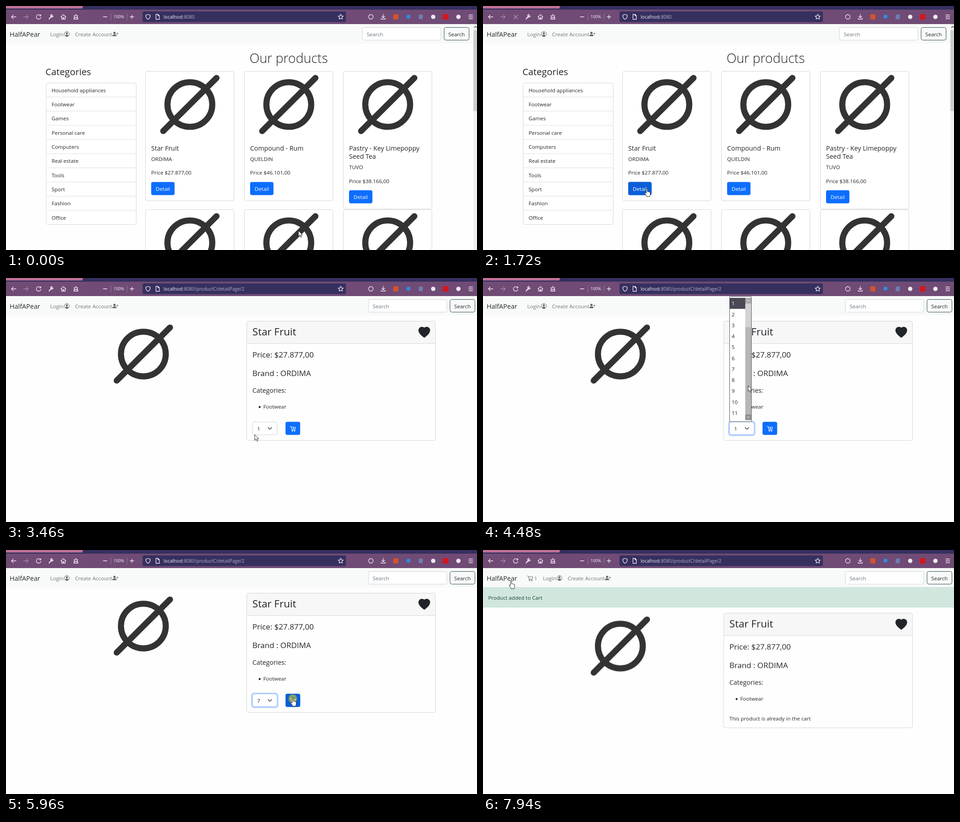
An HTML page for the animation above (8 s loop, 1038x540 px).

```html
<!DOCTYPE html>
<html lang="en">
<head>
<meta charset="utf-8">
<title>Shop walkthrough</title>
<style>
html, body { margin: 0; width: 100%; height: 100%; overflow: hidden; background: #fefefe; }
svg { display: block; width: 1038px; height: 540px; }
text { font: 11.6px "Open Sans", "Noto Sans", sans-serif; fill: #212529; white-space: pre; }
.h5 { font-size: 14.3px; }
.h4 { font-size: 17.1px; }
.h3 { font-size: 20.3px; }
.h2 { font-size: 22.6px; }
.display { font-size: 28.7px; font-weight: 300; }
.small { font-size: 10.1px; fill: #f4f1f8; }
.dim { fill: #b5b0ca; }
.muted { fill: #6c757d; }
.white { fill: #fff; }
.box { fill: #fff; stroke: #d4d5d6; }
.icon { fill: none; stroke: #f3e9f5; stroke-width: 1.3; stroke-linecap: round; stroke-linejoin: round; }
.primary { fill: #0d6efd; }
.hover { fill: #0b5ed7; }

/* Everything shares one 8 s loop. "cut" layers switch hard, others move. */
.cut { animation: 8s step-end infinite; }
#home { animation-name: home; }
#scroll { animation-name: home; }
#detail { animation-name: detail; }
#url { animation-name: url; }
#search { animation-name: search; }
#links { animation-name: links; }
#product { animation-name: product; }
#form { animation-name: form; }
.added { animation-name: added; }
#reload { animation-name: reload; }
#stop { animation-name: stop; }
#focus { animation-name: focus; }
#popup { animation-name: popup; }
#one, #pick1 { animation-name: one; }
#seven { animation-name: seven; }
#pick7 { animation-name: pick7; }
#pick1 { animation-name: pick1; }
#hoverDetail { animation-name: hoverDetail; }
#hoverCart { animation-name: hoverCart; }
#arrow { animation-name: arrow; }
#hand { animation-name: hand; }
#ripple { animation-name: ripple; }
#cursor { animation: cursor 8s ease-in-out infinite; }
#burst { animation: burst 8s linear infinite; }

@keyframes home { 0% { opacity: 1 } 29.6%, 100% { opacity: 0 } }
@keyframes detail { 0% { opacity: 0 } 29.6%, 100% { opacity: 1 } }
@keyframes url { 0% { opacity: 0 } 26.4%, 100% { opacity: 1 } }
@keyframes search { 0% { transform: none } 29.6%, 100% { transform: translateX(13px) } }
@keyframes links { 0% { transform: none } 81.25%, 100% { transform: translateX(34.4px) } }
@keyframes product { 0% { transform: none } 81.25%, 100% { transform: translateY(44.3px) } }
@keyframes form { 0% { opacity: 1 } 81.25%, 100% { opacity: 0 } }
@keyframes added { 0% { opacity: 0 } 81.25%, 100% { opacity: 1 } }
@keyframes reload { 0%, 37.2%, 85.6%, 100% { opacity: 1 } 18.9%, 76.2% { opacity: 0 } }
@keyframes stop { 0%, 37.2%, 85.6%, 100% { opacity: 0 } 18.9%, 76.2% { opacity: 1 } }
@keyframes focus { 0% { opacity: 0 } 49.1%, 100% { opacity: 1 } }
@keyframes popup { 0%, 64.4%, 100% { opacity: 0 } 49.1% { opacity: 1 } }
@keyframes one { 0% { opacity: 1 } 64.4%, 100% { opacity: 0 } }
@keyframes seven { 0% { opacity: 0 } 64.4%, 100% { opacity: 1 } }
@keyframes pick1 { 0% { opacity: 1 } 58.6%, 100% { opacity: 0 } }
@keyframes pick7 { 0% { opacity: 0 } 58.6%, 100% { opacity: 1 } }
@keyframes hoverDetail { 0% { opacity: 0 } 14.1%, 100% { opacity: 1 } }
@keyframes hoverCart { 0% { opacity: 0 } 71.8%, 100% { opacity: 1 } }
@keyframes arrow { 0%, 29.6%, 81.25% { opacity: 1 } 14.1%, 71.8%, 94.4%, 100% { opacity: 0 } }
@keyframes hand { 0%, 29.6%, 81.25% { opacity: 0 } 14.1%, 71.8%, 94.4%, 100% { opacity: 1 } }
@keyframes ripple {
  0%, 19.9%, 64.4%, 76.2%, 99.1%, 100% { opacity: 0 }
  18%, 62.6%, 74.4%, 97.4% { opacity: .5 }
}
@keyframes cursor {
  0%, .4% { transform: translate(644px, 497px) }
  10.4%, 11.1% { transform: translate(382.5px, 412.5px) }
  16.2%, 18.9% { transform: translate(366px, 404px) }
  21.4%, 36.9% { transform: translate(361px, 405px) }
  45.7%, 53.1% { transform: translate(583px, 335px) }
  56% { transform: translate(584px, 238px) }
  60.2%, 64.2% { transform: translate(568px, 196px) }
  73.6%, 85.1% { transform: translate(632px, 329px) }
  94.9%, 95.5% { transform: translate(61px, 72px) }
  97.4%, 100% { transform: translate(62px, 69px) }
}
/* The circle has radius 13, centred on its own origin. */
@keyframes burst {
  0%, 28.9% { transform: scale(0); opacity: .9 }
  29.75% { transform: scale(2); opacity: .85 }
  34% { transform: scale(14); opacity: 0 }
  34.1%, 80.9% { transform: scale(0); opacity: .9 }
  81.375% { transform: scale(1); opacity: .85 }
  81.8% { transform: scale(2); opacity: .8 }
  85% { transform: scale(14); opacity: 0 }
  85.1%, 100% { transform: scale(0); opacity: 0 }
}
</style>
</head>
<body>
<svg viewBox="0 0 1038 540" xmlns="http://www.w3.org/2000/svg">
  <defs>
    <g id="noImage" fill="none" stroke="#343334" stroke-width="13.4" stroke-linecap="round">
      <circle r="49.4"/><path d="M-58.7 58.7L58.7-58.7"/>
    </g>
    <g id="cart" fill="none" stroke-width="1.1" stroke-linecap="round" stroke-linejoin="round">
      <path d="M-5.8-5h2l2 7.4h6.4l1.4-5.6h-9.3"/>
      <circle cx="-1" cy="4.8" r="1"/><circle cx="4" cy="4.8" r="1"/>
    </g>
    <clipPath id="tab"><path d="M0 0h169v3q0 2.500-2.500 2.500H0z"/></clipPath>
  </defs>
  <rect width="1038" height="540" fill="#fefefe"/>

  <!-- Page header -->
  <rect y="40" width="1038" height="42.500" fill="#f8faf9"/>
  <text x="8" y="68" style="font-size:14.5px">HalfAPear</text>
  <g class="cut added">
    <use href="#cart" x="103.500" y="62.500" stroke="#6c757d"/>
    <text x="113" y="66.500" class="muted">1</text>
  </g>
  <g id="links" class="cut">
    <text x="97.500" y="66.500" class="muted">Login</text>
    <g fill="#63666b">
      <circle cx="134" cy="62" r="5.500" fill="none" stroke="#63666b" stroke-width="1"/>
      <circle cx="134" cy="60.500" r="2.300"/>
      <path d="M129.800 65.800q4.200-4.600 8.400 0q-4.200 3.800-8.400 0z"/>
      <circle cx="239" cy="59.500" r="2.500"/>
      <path d="M234.300 66.700q0-4 4.700-4t4.700 4z"/>
      <path d="M243 61h4.400M245.200 58.800v4.400" stroke="#63666b" stroke-width="1"/>
    </g>
    <text x="152" y="66.500" class="muted">Create Account</text>
  </g>
  <g id="search" class="cut">
    <rect x="785.500" y="47.500" width="173" height="28" rx="4" fill="#fff" stroke="#ced4da"/>
    <text x="795" y="66.500" class="muted">Search</text>
    <rect x="965.500" y="47.500" width="55" height="28" rx="4" fill="none" stroke="#2d4a55"/>
    <text x="993" y="66.500" text-anchor="middle">Search</text>
  </g>

  <!-- Product list -->
  <g id="home" class="cut">
    <text x="623" y="126" class="display" text-anchor="middle">Our products</text>
    <text x="87" y="153" class="h3">Categories</text>
    <g id="categories"></g>
    <g id="cards"></g>
    <g id="hoverDetail" class="cut">
      <rect x="320" y="389.500" width="51.500" height="29" rx="4" class="hover"/>
      <text x="345.800" y="408.800" class="white" text-anchor="middle">Detail</text>
    </g>
  </g>
  <g id="scroll" class="cut">
    <rect x="1030" y="40" width="8" height="500" fill="#f0f0f0"/>
    <rect x="1030" y="53.500" width="8" height="179" fill="#cdcdcd"/>
    <path d="M1032 48l3-3 3 3" fill="none" stroke="#505050" stroke-width="1.500"/>
  </g>

  <!-- Product page -->
  <g id="detail" class="cut">
    <g class="cut added">
      <rect x="-2" y="83" width="1042" height="43.500" fill="#d1e7dd" stroke="#bfdccf"/>
      <text x="11.500" y="110" style="fill:#1d403a">Product added to Cart</text>
    </g>
    <g id="product" class="cut">
      <use href="#noImage" x="302.700" y="168.300"/>
      <path d="M530.500 145v-45.500q0-4 4-4h408q4 0 4 4V145z" fill="#f7f7f7" stroke="#d4d5d6"/>
      <text x="543" y="127" class="h2">Star Fruit</text>
      <path transform="translate(909 108) scale(1.610)" fill="#212529" d="M8 1.314C12.438-3.248 23.534 4.735 8 15-7.534 4.736 3.562-3.248 8 1.314z"/>
      <text x="543" y="176" class="h4">Price: $27.877,00</text>
      <text x="543" y="216.500" class="h4">Brand : ORDIMA</text>
      <text x="543" y="254" class="h5">Categories:</text>
      <circle cx="559" cy="285.500" r="2.200" fill="#212529"/>
      <text x="567" y="289.200">Footwear</text>
      <g id="form" class="cut">
        <path d="M530.500 145v210.500q0 4 4 4h408q4 0 4-4V145" fill="none" stroke="#d4d5d6"/>
        <rect x="543" y="318.500" width="54.500" height="28.500" rx="4" fill="#fff" stroke="#ced4da"/>
        <g id="focus" class="cut" fill="none">
          <rect x="541.500" y="317" width="57.500" height="31.500" rx="5.500" stroke="#0d6efd" stroke-opacity=".25" stroke-width="3"/>
          <rect x="543" y="318.500" width="54.500" height="28.500" rx="4" stroke="#86b7fe"/>
        </g>
        <text id="one" class="cut" x="553.500" y="337.500">1</text>
        <text id="seven" class="cut" x="553.500" y="337.500">7</text>
        <path d="M577.800 331l3.800 3.800 3.800-3.800" fill="none" stroke="#343a40" stroke-width="1.500" stroke-linecap="round"/>
        <rect x="616" y="318.300" width="32.300" height="29" rx="4" class="primary"/>
        <rect id="hoverCart" x="616" y="318.300" width="32.300" height="29" rx="4" class="cut hover"/>
        <use href="#cart" x="632" y="333.500" stroke="#fff"/>
        <path d="M633.500 331v3.600M631.700 332.800h3.600" stroke="#fff"/>
      </g>
      <g class="cut added">
        <path d="M530.500 145v200q0 4 4 4h408q4 0 4-4V145" fill="none" stroke="#d4d5d6"/>
        <text x="543" y="332.700">This product is already in the cart</text>
      </g>
    </g>
  </g>

  <!-- Browser bar -->
  <rect width="1038" height="8" fill="#34305f"/>
  <rect y="8" width="1038" height="32" fill="#704b75"/>
  <g clip-path="url(#tab)">
    <rect width="169" height="6" fill="#c4709a"/>
    <g transform="translate(12 -7)"><circle id="burst" r="13" fill="#7c4c59"/></g>
  </g>
  <rect x="301" y="12" width="448" height="23.500" rx="2.500" fill="#36305f"/>
  <g class="icon">
    <path d="M22 24H12m4-4l-4 4 4 4"/>
    <path d="M39 24h10m-4-4l4 4-4 4" opacity=".4"/>
    <path id="reload" class="cut" d="M76 21.200a5 5 0 1 0 .8 4M76.800 18.800v3h-3"/>
    <path id="stop" class="cut" d="M67.800 20l8.400 8.400m0-8.400l-8.400 8.400" opacity=".6" stroke="#b99cbe"/>
    <path d="M95 28.500l5.500-5.500" stroke-width="2.200"/>
    <path d="M104 21.500a3 3 0 1 1-2.500-2.700l-1.300 2 1.500 1.500z"/>
    <path d="M121 24l5.500-5 5.500 5m-9.500-1v6h8v-6m-5 6v-3.500h2V29"/>
    <path d="M154 18.500l1.500 2.800 3 .5-2.200 2 .7 2.700-3-1.200-3 1.200.7-2.700-2.200-2 3-.5zM149.500 26v3h9v-3"/>
    <path d="M214.500 24h8M273.500 24h8m-4-4v8"/>
    <path d="M231.500 17v14M266.500 17v14" stroke-width=".8" opacity=".35"/>
    <path d="M313 18.500l5 1.800q0 7-5 9.200-5-2.200-5-9.200z"/>
    <path d="M330.500 18.500h4.500l3 3v8h-7.500zM335 18.500v3h3"/>
    <path d="M737.700 18.200l1.700 3.600 4 .5-2.900 2.700.7 4-3.500-2-3.500 2 .7-4-2.900-2.700 4-.5z"/>
    <path d="M831.500 18.500v7.500m-3-3l3 3 3-3m-7.500 4v2h9v-2"/>
    <path d="M1020 20h8.500m-8.500 4h8.500m-8.500 4h8.500"/>
    <circle cx="804" cy="24" r="5"/>
  </g>
  <rect x="853.500" y="18.500" width="11" height="11" fill="#d9532c"/>
  <circle cx="887" cy="23.500" r="4.500" fill="#2f8be0"/>
  <rect x="909.500" y="19" width="9" height="10" fill="#6a7fae"/>
  <circle cx="941.500" cy="24" r="4.800" fill="#eee6f1"/>
  <rect x="963" y="18" width="12" height="12" fill="#d3161e"/>
  <circle cx="997" cy="24" r="4.800" fill="#f3e9f5"/>
  <text x="248.700" y="27.300" class="small" text-anchor="middle" style="font-size:9.200px">100%</text>
  <text x="347.500" y="28" class="small">localhost<tspan class="dim">:8080</tspan></text>
  <text id="url" x="416" y="28" class="small dim cut">/productC/detailPage/2</text>

  <!-- Quantity list -->
  <g id="popup" class="cut">
    <rect x="543.500" y="41" width="48" height="277" rx="1" fill="#fff" stroke="#55545f"/>
    <g id="rows"></g>
    <rect x="578" y="44" width="13" height="270" fill="#d2d2d2"/>
    <rect x="578" y="44" width="13" height="12.500" fill="#a9a9a9"/>
    <rect x="578" y="109" width="13" height="193" fill="#b6b6b6"/>
    <rect x="578" y="302" width="13" height="12.500" fill="#8f8f8f"/>
    <path d="M581.500 51.800l3-3 3 3M581.500 306.500l3 3 3-3" fill="none" stroke="#d9d9d9" stroke-width="1.200"/>
  </g>

  <!-- Pointer -->
  <g id="cursor">
    <circle id="ripple" class="cut" r="9.500" fill="#f0e200"/>
    <path id="arrow" class="cut" d="M.4.300v12.700l2.900-2.700 2.200 4.700 2-.9-2.100-4.600h3.900z" fill="#fff" stroke="#111" stroke-width=".9"/>
    <path id="hand" class="cut" d="M-1.300 9.500V.700q0-1.300 1.200-1.300T1.200.700v5q1.200-.8 2.200.5 1.200-.7 2.100.6 2.200-.5 2.200 1.500v3.500q0 1.500-1 3v2H-.5v-1.300L-4 10.300q-1.200-1.800.2-2.200 1.200-.2 2.500 1.400z" fill="#fff" stroke="#111" stroke-width=".9"/>
  </g>
</svg>
<script>
const fill = (id, items, draw) =>
  document.getElementById(id).innerHTML = items.map(draw).join('');
const text = (x, y, s, extra = '') => `<text x="${x}" y="${y}" ${extra}>${s}</text>`;

const categories = ['Household appliances', 'Footwear', 'Games', 'Personal care', 'Computers',
  'Real estate', 'Tools', 'Sport', 'Fashion', 'Office'];
const rowH = 31.36;
fill('categories', categories, (name, i) =>
  (i ? `<path d="M88 ${170 + i * rowH}h199" stroke="#dcdddd"/>`
     : '<rect x="88.500" y="170.500" width="198.500" height="313" rx="4" class="box"/>') +
  text(100.5, 190.5 + i * rowH, name));

const products = [
  { title: ['Star Fruit'], brand: 'ORDIMA', price: '27.877,00' },
  { title: ['Compound - Rum'], brand: 'QUELDIN', price: '46.101,00' },
  { title: ['Pastry - Key Limepoppy', 'Seed Tea'], brand: 'TUVO', price: '38.166,00' },
];
const frame = (x, y, h) =>
  `<rect x="${x + .5}" y="${y + .5}" width="195" height="${h}" rx="4" class="box"/>
   <use href="#noImage" x="${x + 98.2}" y="${y + 74}"/>`;
fill('cards', products, ({ title, brand, price }, i) => {
  const x = 307 + 218 * i, tx = x + 13, drop = 18.3 * (title.length - 1);
  return frame(x, 144, 286.5 + drop) + frame(x, 450, 286) +
    title.map((line, n) => text(tx, 319.7 + 18.3 * n, line, 'class="h5"')).join('') +
    text(tx, 342.7 + drop, brand) +
    text(tx, 373.3 + drop, 'Price $' + price) +
    `<rect x="${tx}" y="${389.5 + drop}" width="51.500" height="29" rx="4" class="primary"/>` +
    text(tx + 25.8, 408.8 + drop, 'Detail', 'class="white" text-anchor="middle"');
});

// Rows 1 and 7 also get a highlighted version on top.
fill('rows', Array.from({ length: 11 }, (_, i) => i + 1), n => {
  const y = 44 + 24.26 * (n - 1), label = extra => text(548, y + 16.3, n, extra);
  const marked = n === 1 || n === 7;
  return label() + (marked ? `<g id="pick${n}" class="cut">
    <rect x="544" y="${y}" width="34" height="24.300" fill="#4a4956"/>${label('class="white"')}</g>` : '');
});
</script>
</body>
</html>
```
